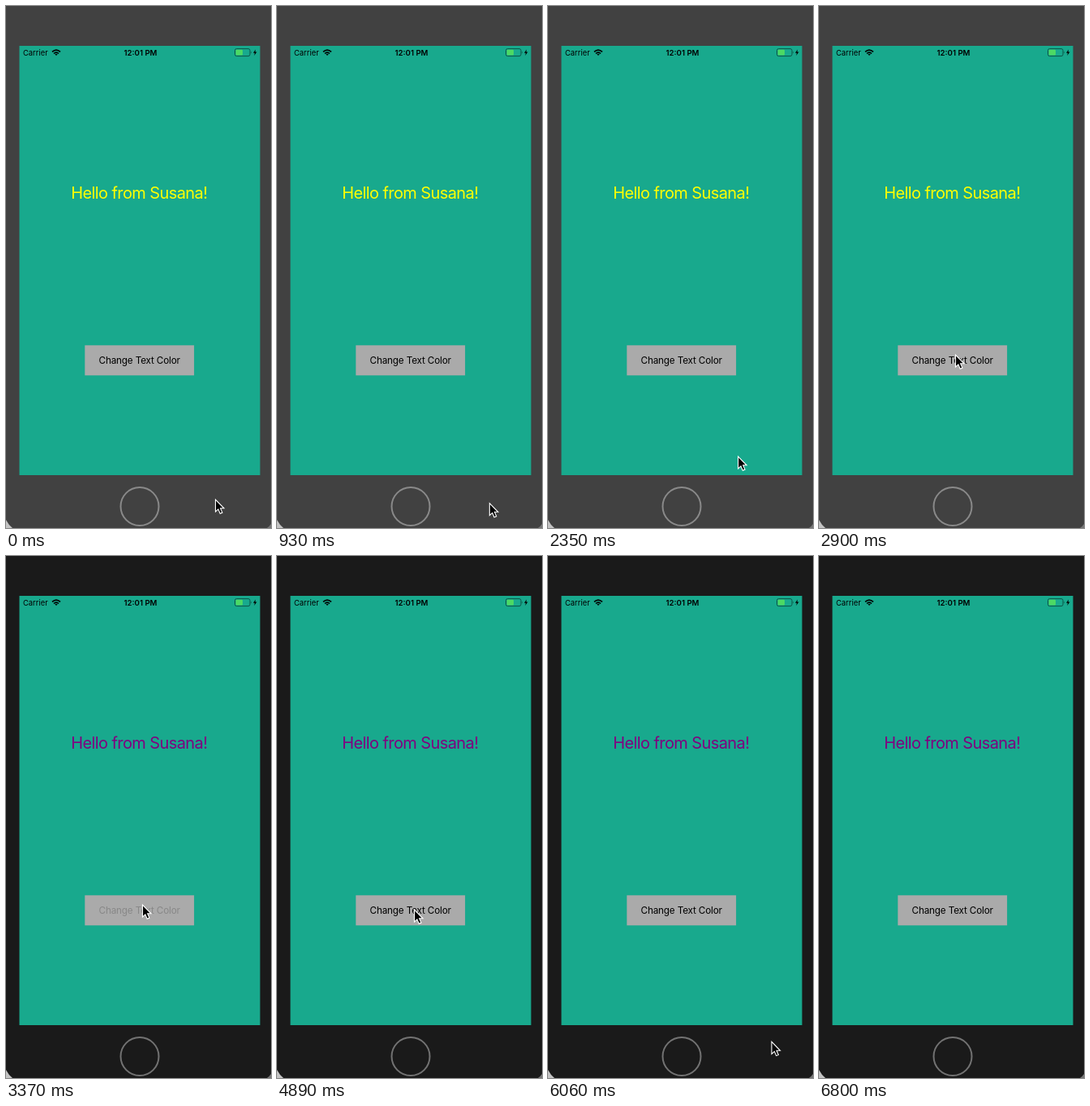
An HTML page that plays this animation: 327 by 642 pixels, repeating every 8 s.

```html
<!DOCTYPE html>
<html lang="en">
<head>
<meta charset="utf-8">
<style>
html, body { margin: 0; width: 100%; height: 100%; overflow: hidden; }
svg { display: block; width: 327px; height: 642px; }
text { font-family: Inter, Roboto, sans-serif; text-anchor: middle; }
</style>
</head>
<body>
<svg viewBox="0 0 327 642">
  <rect id="body" width="327" height="642"/>
  <path d="M0 632Q3 638 8 642H0Z" fill="#c4c4c4"/>
  <path d="M327 637Q325 640 322 642H327Z" fill="#777"/>
  <rect x="16.5" y="49" width="297" height="528" fill="#18a98d"/>
  <circle id="home" cx="165" cy="615.5" r="23.5" fill="none" stroke-width="2"/>

  <text x="21" y="60.5" font-size="9.4" style="text-anchor:start">Carrier</text>
  <g fill="none" stroke="#000" stroke-width="1.7">
    <path d="M57 56.4Q62 51.8 67 56.4M59 58.5Q62 55.7 65 58.5"/>
    <path d="M60.3 59.3Q62 58 63.7 59.3L62 61Z" fill="#000" stroke="none"/>
  </g>
  <text x="166" y="60.5" font-size="9.6" font-weight="600">12:01 PM</text>
  <rect x="282.5" y="52.6" width="18.5" height="9" rx="2" fill="none" stroke="#0c5547"/>
  <rect x="283.6" y="53.8" width="8.4" height="6.6" rx="1" fill="#4cd964"/>
  <path d="M302 55.6Q303.6 57.2 302 58.8Z" fill="#0c5547"/>
  <path d="M308 53.5L305 57.7H307L306.2 61L309.5 56.5H307.4Z"/>

  <text id="hello" x="164.3" y="237.3" font-size="20" letter-spacing="-.6">Hello from Susana!</text>
  <rect x="97.3" y="417.3" width="134.8" height="37" fill="#aaa"/>
  <text id="label" x="164.7" y="440" font-size="11.7" letter-spacing="-.15">Change Text Color</text>
  <path id="cursor" d="M.5 1V16L3.9 12.9L6.2 18.2L8.9 17.1L6.6 11.8H11Z" stroke="#fff" stroke-width="1.1"/>
</svg>
<script>
const $ = id => document.getElementById(id);
const TICK = 145, FADE = 400;
const presses = [3370, 5330];
const moves = [
  { start: 500, end: 1230, x: 269, y: 619 },
  { start: 1800, end: 2900, x: 168, y: 428 },
  { start: 4745, end: 4890, x: 169, y: 434 },
  { start: 5330, end: 6210, x: 285, y: 611 },
  { start: 6365, end: 6800, x: 315, y: 652 }
];

function progress(t, start, end) {
  if (t >= end) return 1;
  return Math.max(0, Math.floor((t - start) / TICK) * TICK / (end - start));
}
const ease = p => p * p * (3 - 2 * p);

function pointer(t) {
  let x = 258, y = 606;
  for (const m of moves) {
    const p = ease(progress(t, m.start, m.end));
    x += (m.x - x) * p;
    y += (m.y - y) * p;
  }
  return `translate(${x} ${y})`;
}

function labelColor(t) {
  const press = presses.findLast(p => p <= t);
  const grey = press ? 136 * (1 - progress(t, press, press + FADE)) : 0;
  return `rgb(${grey},${grey},${grey})`;
}

function draw(now) {
  const t = now % 8000, active = t >= presses[0];
  $('body').setAttribute('fill', active ? '#1a1a1a' : '#414141');
  $('home').setAttribute('stroke', active ? '#727272' : '#898989');
  $('hello').setAttribute('fill', active ? '#800080' : '#ff0');
  $('label').setAttribute('fill', labelColor(t));
  $('cursor').setAttribute('transform', pointer(t));
  requestAnimationFrame(draw);
}
draw(performance.now());
</script>
</body>
</html>
```
